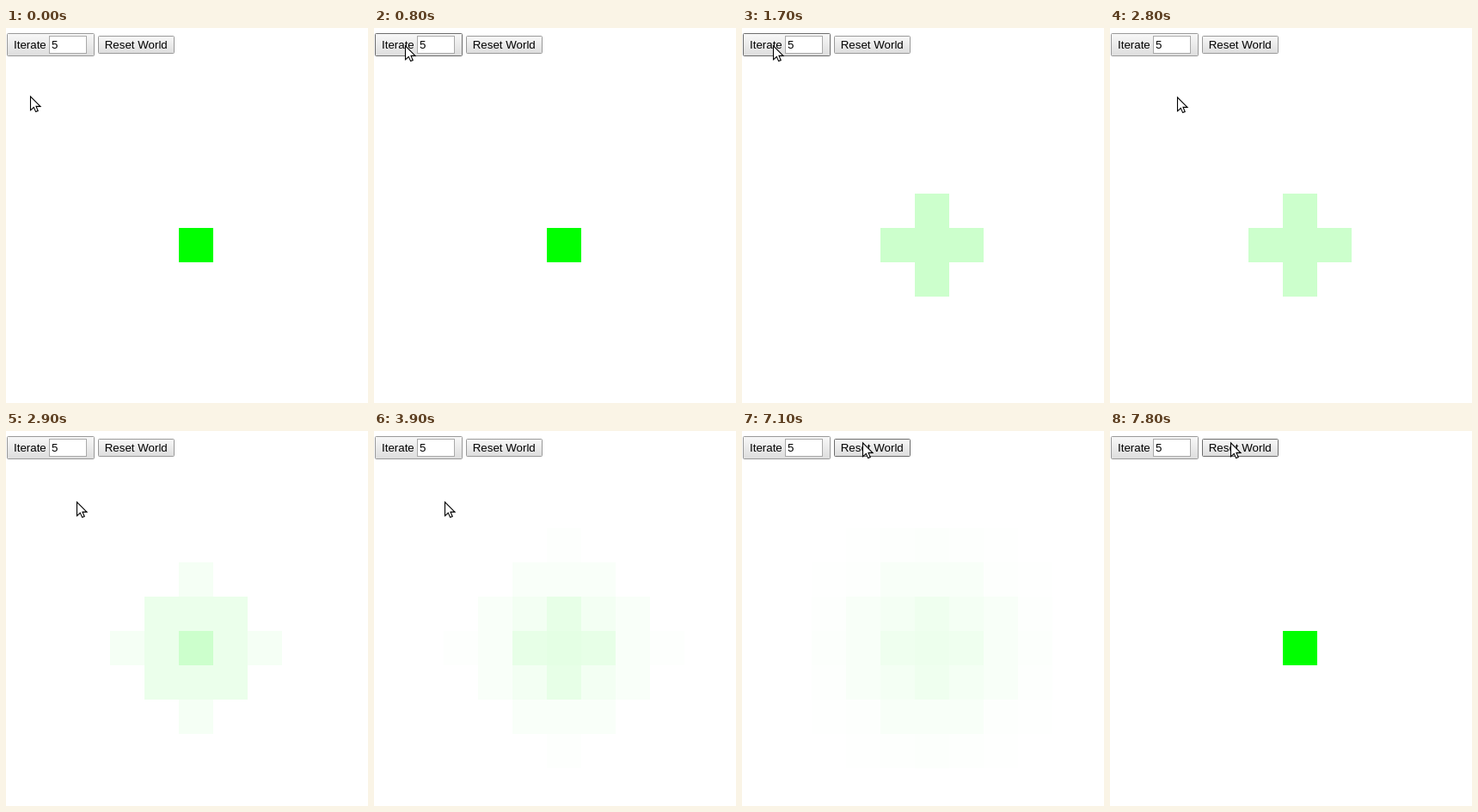
Recreate the animation shown at these times as an HTML page. Size 421 by 437 pixels, loop 8000 ms.

```html
<!DOCTYPE html>
<html lang="en">
<head>
<meta charset="utf-8">
<title>Diffusion world</title>
<style>
html, body { margin: 0; width: 100%; height: 100%; overflow: hidden; background: #fff; }
svg { display: block; }
text { font: 13.333px "Liberation Sans", Arial, sans-serif; fill: #000; }
</style>
</head>
<body>
<svg width="421" height="437" viewBox="0 0 421 437">
  <defs>
    <linearGradient id="up" x2="0" y2="1">
      <stop stop-color="#f8f8f8"/><stop offset="1" stop-color="#ddd"/>
    </linearGradient>
    <linearGradient id="down" x2="0" y2="1">
      <stop stop-color="#ddd"/><stop offset="1" stop-color="#f8f8f8"/>
    </linearGradient>
  </defs>
  <rect width="421" height="437" fill="#fff"/>
  <g id="world" shape-rendering="crispEdges"></g>
  <rect id="iterate" x="1.5" y="6.5" width="101" height="26" rx="1"/>
  <text x="9" y="24">Iterate</text>
  <rect x="50.5" y="9.5" width="43" height="20" fill="#fff" stroke="#a9a9a9"/>
  <text x="53" y="24">5</text>
  <rect id="reset" x="107.5" y="9.5" width="88" height="20" rx="1"/>
  <text x="114.7" y="24">Reset World</text>
  <g id="cursor">
    <path d="M1.5 2V18L5.2 14.6 7.6 19.6 10.2 18.6 8 13.4H13Z" opacity=".15"/>
    <path d="M.5 .8V16.8L4.3 13.4 6.6 18.6 9.2 17.5 7 12.4H12Z" fill="#fff" stroke="#000" stroke-width="1.1"/>
  </g>
</svg>
<script>
const LOOP = 8000, STEP = 100, CELL = 40, SIZE = 11, MID = 5, ROUNDS = 5;
const CLICK = 1700, RESET = 7800;
const $ = id => document.getElementById(id);
const clamp = (v, lo, hi) => Math.min(hi, Math.max(lo, v));
const ease = p => p * p * (3 - 2 * p);

// Pointer moves: first step, last step, end point
const home = { x: 28, y: 79 };
const moves = [
  { from: 400, to: 800, x: 36, y: 20 },
  { from: 2200, to: 2400, x: 43, y: 45 },
  { from: 2600, to: 2800, x: 78, y: 80 },
  { from: 2900, to: 2900, x: 82, y: 82 },
  { from: 6600, to: 6600, x: 83, y: 80 },
  { from: 6700, to: 7100, x: 140, y: 13 }
];

function pointer(t) {
  let { x, y } = home;
  for (const m of moves) {
    const p = ease(clamp((t - m.from + STEP) / (m.to - m.from + STEP), 0, 1));
    x += (m.x - x) * p;
    y += (m.y - y) * p;
  }
  return { x: Math.round(x), y: Math.round(y) };
}

const buttons = [
  { el: $("iterate"), down: 1500, up: 1600 },
  { el: $("reset"), down: 7600, up: RESET }
];

function paint(b, t, { x, y }) {
  const box = b.el.getBBox();
  const over = x >= box.x && x <= box.x + box.width && y >= box.y && y <= box.y + box.height;
  b.el.setAttribute("fill", t >= b.down && t < b.up ? "url(#down)" : "url(#up)");
  b.el.setAttribute("stroke", over ? "#6c6c6c" : "#999");
}

// Each cell becomes the mean of itself and its four neighbours
function spread(grid) {
  const at = (r, c) => grid[r]?.[c] ?? 0;
  return grid.map((row, r) => row.map((v, c) =>
    (v + at(r - 1, c) + at(r + 1, c) + at(r, c - 1) + at(r, c + 1)) / 5));
}

const states = [Array.from({ length: SIZE }, (_, r) =>
  Array.from({ length: SIZE }, (_, c) => r === MID && c === MID ? 1 : 0))];
for (let i = 0; i < ROUNDS; i++) states.push(spread(states[i]));

const cells = states[0].map((row, r) => row.map((_, c) => {
  const el = document.createElementNS("http://www.w3.org/2000/svg", "rect");
  const box = { x: 1 + c * CELL, y: 33 + r * CELL, width: CELL, height: CELL };
  for (const k in box) el.setAttribute(k, box[k]);
  $("world").append(el);
  return el;
}));

// The click runs one round, a one-second timer the others
function rounds(t) {
  if (t < CLICK || t >= RESET) return 0;
  return clamp(1 + Math.floor((t - CLICK - 200) / 1000), 1, ROUNDS);
}

function draw(time) {
  const t = Math.floor(time % LOOP / STEP) * STEP;
  const pos = pointer(t);
  $("cursor").setAttribute("transform", `translate(${pos.x} ${pos.y})`);
  for (const b of buttons) paint(b, t, pos);
  states[rounds(t)].forEach((row, r) => row.forEach((v, c) => {
    const k = Math.round(255 * (1 - v));
    cells[r][c].setAttribute("fill", k < 255 ? `rgb(${k},255,${k})` : "none");
  }));
}

const start = performance.now();
function frame() {
  draw(performance.now() - start);
  requestAnimationFrame(frame);
}
frame();
</script>
</body>
</html>
```
